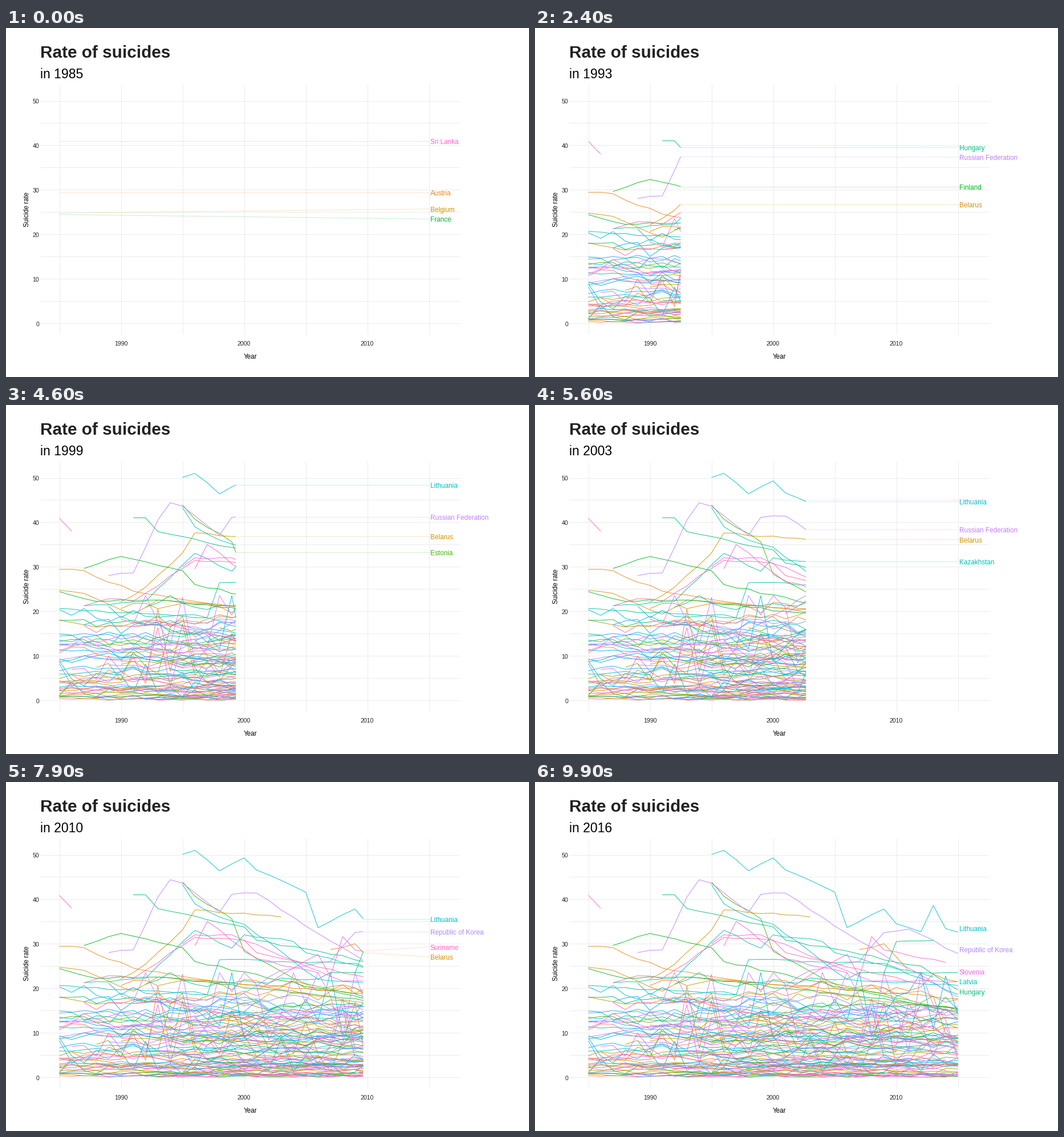
Write a matplotlib script that moves like this. It is 917 by 611 pixels and loops after 10 s.

```python
import numpy as np
import matplotlib.pyplot as plt
from matplotlib.animation import FuncAnimation
from matplotlib.collections import LineCollection

W, H, DPI = 917, 611, 64
PX = 72 / DPI                      # points per pixel
FRAMES, YEARS, FIRST, GROUPS = 100, 31, 1985, 101
LABEL_X, LABEL_GAP = 744, 17.5
GOLDEN = (5 ** 0.5 - 1) / 2
plt.rcParams["font.family"] = "Liberation Sans"


def sx(t):
    return 93.5 + 21.6 * np.asarray(t)


def sy(v):
    return 516.5 - 7.78 * np.asarray(v)


def hue_color(i, lum=65, chroma=100):
    """Evenly spaced hue on the polar LUV wheel, as sRGB."""
    h = np.radians(15 + 360 * i / GROUPS)
    y = ((lum + 16) / 116) ** 3
    u = chroma * np.cos(h) / (13 * lum) + 0.1978
    v = chroma * np.sin(h) / (13 * lum) + 0.4683
    xyz = np.array([9 * y * u / (4 * v), y, y * (12 - 3 * u - 20 * v) / (4 * v)])
    m = np.array([[3.2405, -1.5371, -0.4985],
                  [-0.9693, 1.8760, 0.0416],
                  [0.0556, -0.2040, 1.0572]])
    lin = np.clip(m @ xyz, 0, 1)
    return tuple(np.where(lin > 0.00304, 1.055 * lin ** (1 / 2.4) - 0.055, 12.92 * lin))


# ---- series: the leaders follow key points, the rest wander ------------
rng = np.random.default_rng(7)
series, names = {}, {}


def lead(i, name, *knots):
    """Join (year, rate) knots, with a slight wobble in the years between."""
    years, rates = np.transpose(knots)
    span = np.arange(years[0], years[-1] + 1).astype(int)
    wobble = np.where(np.isin(span, years), 0, rng.uniform(-0.25, 0.25, len(span)))
    vals = series.setdefault(i, np.full(YEARS, np.nan))
    vals[span - FIRST] = np.interp(span, years, rates) + wobble
    names[i] = name


def wander(i):
    """Skewed spread of levels, easing down where high; a few groups jump about."""
    level = 0.2 + 20 * (i * GOLDEN % 1) ** 1.35
    if i % 9 == 4:
        vals = level * rng.gamma(4, 0.25, YEARS)
    else:
        fall = 1 - rng.uniform(0, 0.02) * level * np.linspace(0, 1, YEARS)
        drift = np.cumsum(rng.normal(0, 0.03, YEARS))
        vals = level * (fall + drift) + rng.normal(0, 0.2 + 0.03 * level, YEARS)
    vals = np.clip(vals, 0, 23.5)
    if rng.random() < 0.5:
        vals[:rng.integers(1, 14)] = np.nan
    if rng.random() < 0.25:
        vals[rng.integers(26, YEARS):] = np.nan
    return vals


lead(6, "Austria", (1985, 29.4), (1987, 29.1), (1989, 26.5), (1992, 23.9), (2015, 14.8))
lead(11, "Belarus", (1990, 22.1), (1992, 25.4), (1995, 33.1), (1996, 37.6), (2003, 36))
lead(11, "Belarus", (2007, 28.7), (2009, 30), (2011, 24))
lead(12, "Belgium", (1985, 24.7), (1987, 24), (1991, 19.3), (1993, 22.5), (2015, 17.6))
lead(30, "Estonia", (1995, 43.9), (1996, 40.7), (1999, 35.6), (2000, 28.3), (2005, 21),
     (2015, 15))
lead(32, "Finland", (1987, 29.6), (1990, 32.3), (1995, 29.1), (1996, 26), (2015, 14.5))
lead(33, "France", (1985, 24.4), (1988, 22.2), (1993, 22.5), (2015, 15.5))
lead(39, "Guyana", (2009, 23.4), (2010, 30.5), (2013, 30.7))
lead(40, "Hungary", (1991, 41), (1992, 41), (1993, 37.9), (2000, 33.8), (2001, 30.8),
     (2012, 25), (2015, 19.6))
lead(46, "Japan", (1985, 20.6), (1997, 18.5), (1998, 26.4), (2009, 25.6), (2015, 18.6))
lead(47, "Kazakhstan", (1987, 21.2), (1992, 22.2), (1996, 33), (1999, 29), (2000, 32),
     (2004, 30.5), (2005, 28), (2013, 22.5))
lead(51, "Latvia", (1995, 43.3), (1996, 39), (1998, 36), (2000, 34.4), (2006, 22),
     (2015, 20.6))
lead(52, "Lithuania", (1995, 50.1), (1996, 51), (1998, 46.4), (2000, 49.3), (2001, 46.6),
     (2005, 41.6), (2006, 33.6), (2009, 37.8), (2010, 34.5), (2012, 32.7), (2013, 38.6),
     (2014, 33.4), (2015, 32.6))
lead(73, "Republic of Korea", (1985, 9), (1997, 14), (2003, 24), (2007, 26), (2009, 32.5),
     (2011, 33.3), (2015, 27.8))
lead(75, "Russian Federation", (1989, 28), (1991, 28.6), (1993, 40.5), (1994, 44.4),
     (1995, 43.6), (1998, 37.1), (1999, 41.1), (2001, 41.4), (2007, 30.6), (2015, 18))
lead(84, "Slovenia", (1995, 30), (1996, 32), (1999, 32), (2008, 21.6), (2015, 21.5))
lead(87, "Sri Lanka", (1985, 40.9), (1986, 38))
lead(87, "Sri Lanka", (1996, 29.5), (1997, 35), (2001, 26.6), (2006, 23.5))
lead(88, "Suriname", (2001, 19.5), (2006, 27.6), (2007, 22.6), (2008, 31.6), (2009, 28.6),
     (2014, 25.8))
lead(95, "Ukraine", (1987, 21.2), (1989, 22.8), (1991, 22.2), (1996, 31.4), (2000, 30.8),
     (2001, 28), (2012, 21))
for i in range(GROUPS):
    if i not in series:
        series[i] = wander(i)
COLORS = [hue_color(i) for i in range(GROUPS)]


# ---- timing and labels --------------------------------------------------
def top(k, n=4):
    ranked = [i for i in names if np.isfinite(series[i][k])]
    return set(sorted(ranked, key=lambda i: -series[i][k])[:n])


TOP = [top(k) for k in range(YEARS - 1)] + [top(YEARS - 1, 5)]
KEYS = [round((FRAMES - 1) * k / YEARS) for k in range(YEARS + 1)]


def labelled(k):
    """Leaders of year k, and those who lead shortly before and after it."""
    before = set().union(*TOP[max(k - 2, 0):k])
    after = set().union(*TOP[k + 1:k + 3])
    return TOP[k] | (before & after)


def value_at(vals, t):
    k = int(t)
    if k == t:
        return vals[k]
    return vals[k] + (vals[k + 1] - vals[k]) * (t - k)


def spread(ys):
    """Push neighbours apart until every label has its gap."""
    ys = list(ys)
    for _ in range(150):
        for j in range(len(ys) - 1):
            push = (LABEL_GAP - (ys[j + 1] - ys[j])) / 2
            if push > 0:
                ys[j] -= push
                ys[j + 1] += push
    return ys


# ---- stage ------------------------------------------------------------
fig = plt.figure(figsize=(W / DPI, H / DPI), dpi=DPI, facecolor="white")
ax = fig.add_axes([0, 0, 1, 1])
ax.set_xlim(0, W)
ax.set_ylim(H, 0)
ax.axis("off")


def text(x, y, s, size, **kw):
    return ax.text(x, y, s, fontsize=size * PX, va="baseline", **kw)


grid = dict(colors="#EBEBEB", linewidth=PX, zorder=1)
ax.vlines(sx(np.arange(0, 31, 5)), 99, 536, **grid)
ax.hlines(sy(np.arange(0, 51, 5)), 60, 796, **grid)

text(60, 52, "Rate of suicides", 29.7, weight="bold", color="#222222")
subtitle = text(60, 88, "", 23, color="black")
for year in (1990, 2000, 2010):
    text(sx(year - FIRST), 555.5, str(year), 10.5, ha="center", color="#222222")
for rate in range(0, 51, 10):
    text(58, sy(rate) + 5, str(rate), 10.5, ha="right", color="#222222")
text(428, 579, "Year", 11.6, ha="center")
text(40, 318, "Suicide rate", 11.5, ha="center", rotation=90, rotation_mode="anchor")

lines = LineCollection([], colors=COLORS, linewidths=0.9 * PX, zorder=2)
leaders = LineCollection([], linewidths=PX, zorder=3)
ax.add_collection(lines, autolim=False)
ax.add_collection(leaders, autolim=False)
tags = [text(LABEL_X, 0, "", 11.7, zorder=4) for _ in range(9)]


def draw(frame):
    t = min(np.interp(frame, KEYS, range(YEARS + 1)), YEARS - 1)
    k = int(t)
    subtitle.set_text(f"in {round(FIRST + YEARS * frame / (FRAMES - 1))}")

    xs = sx(np.append(np.arange(k + 1), t))
    lines.set_segments([
        np.column_stack([xs, sy(np.append(series[i][:k + 1], value_at(series[i], t)))])
        for i in range(GROUPS)])

    heads = [(float(sy(value_at(series[i], t))), i) for i in labelled(k)]
    heads = sorted(h for h in heads if np.isfinite(h[0]))
    head_x = float(sx(t))
    lift = -7 if head_x > 735 else 0       # clear of the line ends
    label_ys = spread(y + lift for y, _ in heads)

    segs, cols = [], []
    for tag in tags:
        tag.set_text("")
    for tag, (y, i), label_y in zip(tags, heads, label_ys):
        tag.set_text(names[i])
        tag.set_position((LABEL_X, label_y + 5))
        tag.set_color(COLORS[i])
        if np.hypot(LABEL_X - head_x, label_y - y) > 20:
            segs.append([(head_x, y), (LABEL_X - 1, label_y)])
            cols.append((*COLORS[i], 0.22))
    leaders.set_segments(segs)
    leaders.set_color(cols or "none")
    return [subtitle, lines, leaders, *tags]


anim = FuncAnimation(fig, draw, frames=FRAMES, interval=100, repeat=True,
                     repeat_delay=0, blit=False)
plt.show()
```
